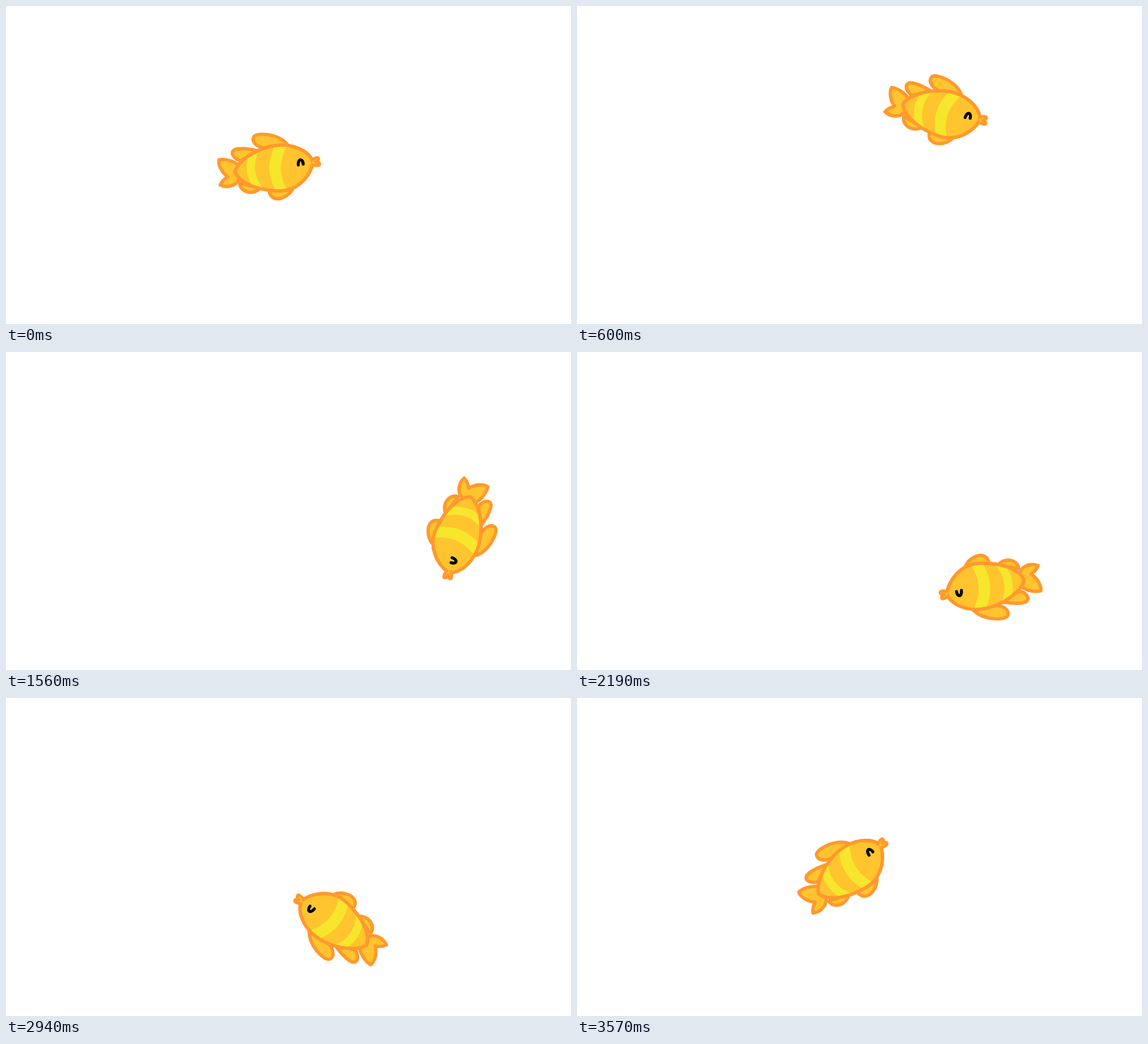
An HTML page that plays this animation: 960x540 px, repeating every 3.6 s.

```html
<!DOCTYPE html>
<html lang="en">
<head>
<meta charset="utf-8">
<title>Swimming fish</title>
<style>
  html, body { margin: 0; width: 100%; height: 100%; overflow: hidden; background: #fff; }
  svg { display: block; width: 960px; height: 540px; }
  .skin { fill: #ffc42e; stroke: #ff992e; stroke-width: 5.6; stroke-linejoin: round; stroke-linecap: round; }
  .stripe { fill: #f6e62c; }
  .eye { fill: none; stroke: #000; stroke-width: 5; stroke-linecap: round; stroke-linejoin: round; }
</style>
</head>
<body>
<svg viewBox="0 0 960 540">
  <g id="fish">
    <g class="skin">
      <path d="M395 270C386 263 373 259 362 261C360 269 366 283 377 290C370 294 366 299 364 304C374 309 390 307 396 294Z"/>
      <path d="M440 241C424 239 417 230 421 222C427 214 463 217 478 235Z"/>
      <path d="M398 263C385 258 381 249 388 244C398 240 414 243 428 246Z"/>
      <path d="M397 301C398 313 410 318 420 316Q428 314 432 309Z"/>
      <path d="M447 313C448 325 457 330 469 326Q483 321 488 309Z"/>
    </g>
    <path id="body" class="skin" d="M389 281C396 261 432 236 470 236C500 237 518 252 522 266C516 291 495 313 466 314C430 314 396 301 389 281Z"/>
    <path class="stripe" d="M457 237Q437 275 458 313L478 312Q456 276 478 237Z"/>
    <path class="stripe" d="M413 253Q403 278 417 303L436 309Q412 275 432 243Z"/>
    <use href="#body" style="fill-opacity:0"/>
    <path class="skin" style="stroke-width:5" d="M519 262C524 258 530 256 531 259C532 262 528 264 526 265C530 264 533 266 533 269C531 272 526 271 521 270"/>
    <path class="eye" d="M496.5 270C496 258 504.500 259 505 268.500"/>
  </g>
</svg>
<script>
const LOOP = 3600, STEP = 30;
const fish = document.getElementById('fish');

// Poses along the swim: time, x, y, heading in degrees
const poses = [
  [30, 499, 265, -16],
  [540, 638, 193, 14],
  [600, 654.6, 186.7, 18.5],
  [960, 753.6, 205.8, 53],
  [1080, 769, 240, 65],
  [1560, 761, 344.6, 113],
  [1620, 756.5, 356, 118.5],
  [2190, 658.8, 405.4, 176.5],
  [2700, 567, 392, 209],
  [2940, 527.5, 362.3, 221],
  [3240, 500, 320, 270],
  [3570, 491, 269, 328.5]
];
const last = poses.length - 1;

const rate = (i, k) => (poses[i + 1][k] - poses[i][k]) / (poses[i + 1][0] - poses[i][0]);

function slope(i, k) {
  if (i === 0) return rate(0, k);
  if (i === last) return rate(last - 1, k);
  const before = poses[i][0] - poses[i - 1][0], after = poses[i + 1][0] - poses[i][0];
  return (rate(i - 1, k) * after + rate(i, k) * before) / (before + after);
}

// Cubic Hermite interpolation of pose component k
function sample(t, k) {
  let i = 0;
  while (i < last - 1 && t > poses[i + 1][0]) i++;
  const h = poses[i + 1][0] - poses[i][0], u = (t - poses[i][0]) / h, v = 1 - u;
  return poses[i][k] * v * v * (1 + 2 * u) + poses[i + 1][k] * u * u * (3 - 2 * u)
    + h * u * v * (slope(i, k) * v - slope(i + 1, k) * u);
}

function draw(now) {
  const t = Math.floor((now % LOOP) / STEP) * STEP;
  // The loop opens on one level pose before the fish turns upward
  const [x, y, angle] = t < STEP ? [491, 269, 0] : [1, 2, 3].map(k => sample(t, k));
  fish.setAttribute('transform', `translate(${x} ${y}) rotate(${angle}) translate(-491 -269)`);
}

function tick() {
  draw(performance.now());
  requestAnimationFrame(tick);
}
tick();
</script>
</body>
</html>
```
